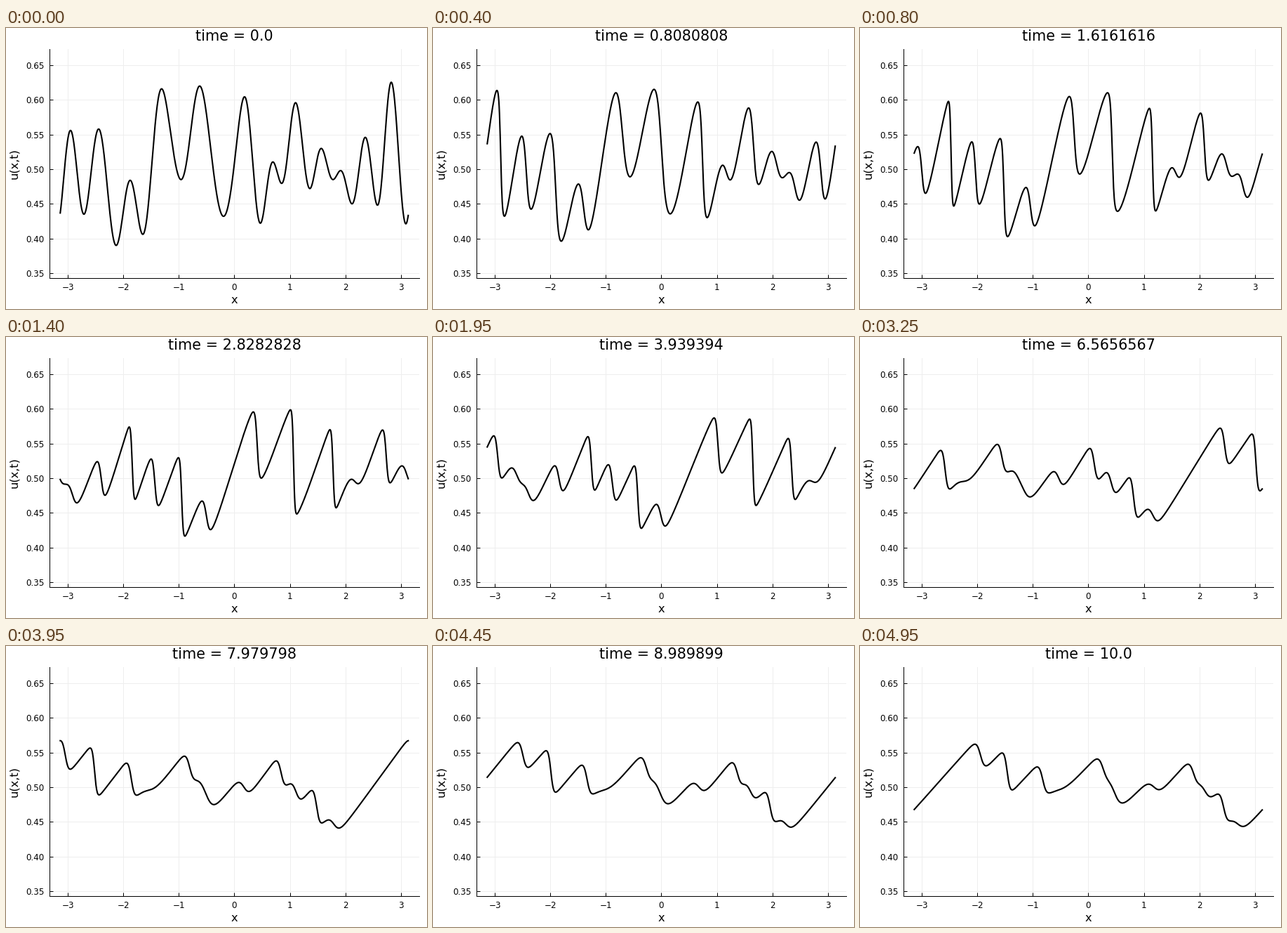
Animation, 600 px wide and 400 px high, one loop 5 s. Source, as a matplotlib script:

```python
import numpy as np
import matplotlib.pyplot as plt
from matplotlib.animation import FuncAnimation

# Viscous Burgers equation u_t + u u_x = NU u_xx on a periodic domain
W, H, DPI = 600, 400, 100
FRAMES, INTERVAL, T_END = 100, 50, 10
N, SUBSTEPS, NU, MEAN = 1024, 8, 0.001, 0.5

# Peaks and troughs of the starting profile (x, u)
EXTREMA = np.array([
    (-2.956, .556), (-2.715, .435), (-2.449, .558), (-2.133, .390),
    (-1.880, .484), (-1.652, .406), (-1.314, .616), (-0.962, .485),
    (-0.627, .620), (-0.196, .432), (0.184, .6045), (0.468, .422),
    (0.693, .5105), (0.854, .4795), (1.103, .596), (1.361, .472),
    (1.566, .530), (1.778, .485), (1.918, .498), (2.122, .450),
    (2.361, .546), (2.582, .448), (2.829, .6255), (3.095, .421),
])
ANCHORS = np.array([(-np.pi, .437), (-1.497, .5)])


def start_profile(x, modes=40):
    """Smooth Fourier series through the points, level at the extrema."""
    k = np.arange(modes + 1)
    weight = 1 / (1 + (k / 10) ** 4)

    def values(p):
        a = np.outer(p, k)
        return np.hstack([np.cos(a) * weight, np.sin(a) * weight])

    def slopes(p):
        a = np.outer(p, k)
        return np.hstack([-np.sin(a) * k * weight, np.cos(a) * k * weight])

    pts = np.vstack([EXTREMA, ANCHORS])
    basis = np.vstack([values(pts[:, 0]), slopes(EXTREMA[:, 0])])
    goal = np.append(pts[:, 1] - MEAN, np.zeros(len(EXTREMA)))
    noise = np.append(np.full(len(pts), .03), np.full(len(EXTREMA), 2.0))
    gram = basis @ basis.T + np.diag(noise ** 2)
    return values(x) @ (basis.T @ np.linalg.solve(gram, goal))


def solve(x):
    """Pseudo-spectral RK4 with an integrating factor; one row per frame."""
    k = np.arange(N // 2 + 1)
    keep = k < N / 3
    dt = T_END / (FRAMES - 1) / SUBSTEPS
    half = np.exp((-NU * k ** 2 - 1j * MEAN * k) * dt / 2)
    full = half ** 2

    def rhs(v):
        return -0.5j * k * keep * np.fft.rfft(np.fft.irfft(v, N) ** 2)

    v = np.fft.rfft(start_profile(x))
    rows = [np.fft.irfft(v, N)]
    for _ in range(FRAMES - 1):
        for _ in range(SUBSTEPS):
            a = rhs(v)
            b = rhs(half * (v + dt / 2 * a))
            c = rhs(half * v + dt / 2 * b)
            d = rhs(full * v + dt * half * c)
            v = full * v + dt / 6 * (full * a + 2 * half * (b + c) + d)
        rows.append(np.fft.irfft(v, N))
    return np.array(rows) + MEAN


def px(size):
    """Pixels to points."""
    return size * 72 / DPI


plt.rcParams["font.family"] = "DejaVu Sans"
x = -np.pi + 2 * np.pi * np.arange(N) / N
u = solve(x)

fig = plt.figure(figsize=(W / DPI, H / DPI), dpi=DPI, facecolor="white")
left, right, top, bottom = 62.4, 588.6, 30.4, 355.6
ax = fig.add_axes([left / W, 1 - bottom / H,
                   (right - left) / W, (bottom - top) / H])
ax.set_xlim(-1.06 * np.pi, 1.06 * np.pi)
ax.set_ylim(.3433, .6729)
ax.set_xticks(range(-3, 4))
ax.set_yticks(np.arange(.35, .66, .05))
ax.yaxis.set_major_formatter("{x:.2f}")
ax.set_axisbelow(True)
ax.grid(color="#eeeeee", linewidth=px(1))
ax.spines[["top", "right"]].set_visible(False)
ax.spines[["left", "bottom"]].set_linewidth(px(1))
ax.tick_params(direction="in", length=px(5), width=px(1), labelsize=px(11.9))
ax.tick_params(axis="x", pad=px(7))
ax.tick_params(axis="y", pad=px(7.5))


def label(cx, base, text, size, **kw):
    return fig.text(cx / W, 1 - base / H, text, fontsize=px(size),
                    ha="center", va="baseline", **kw)


title = label(325.5, 18.3, "", 20.8)
label(325.5, 391.5, "x", 16.3)
label(16, 193, "u(x,t)", 16.3, rotation=90, rotation_mode="anchor")
line, = ax.plot(x, u[0], color="black", linewidth=px(2.1),
                solid_joinstyle="round")


def update(i):
    line.set_ydata(u[i])
    title.set_text(f"time = {str(np.float32(T_END * i / (FRAMES - 1)))}")
    return line, title


anim = FuncAnimation(fig, update, frames=FRAMES, interval=INTERVAL,
                     repeat=True, repeat_delay=0)
plt.show()
```
